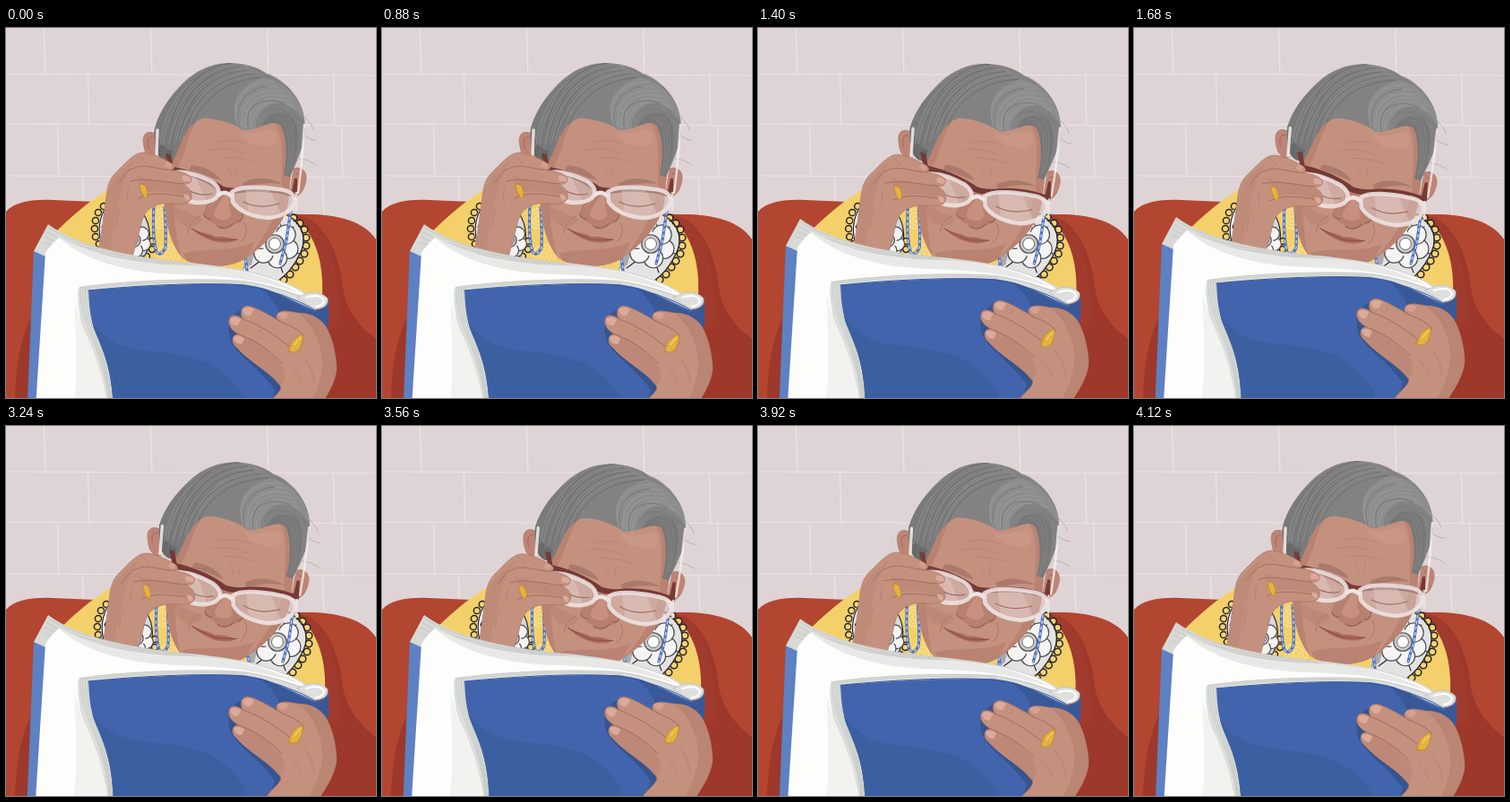
Animation, 413 px wide and 413 px high, one loop 4.16 s. Source, as an HTML page with a canvas:

```html
<!DOCTYPE html>
<html lang="en">
<head>
<meta charset="utf-8">
<title>Reading</title>
<style>
html, body { margin: 0; width: 100%; height: 100%; overflow: hidden; background: #dfd4d5; }
canvas { display: block; width: 100vw; height: 100vh; }
</style>
</head>
<body>
<canvas id="stage" width="413" height="413"></canvas>
<script>
const ctx = document.getElementById('stage').getContext('2d');
const LOOP = 4160, STEP = 40;
const SKIN = '#c4917f', SHADE = '#ba8573', LINE = '#a06d5f', INK = '#25232a';
ctx.lineCap = ctx.lineJoin = 'round';

const fill = (d, color) => { ctx.fillStyle = color; ctx.fill(new Path2D(d)); };
const line = (d, color, w = 1) => {
  ctx.strokeStyle = color;
  ctx.lineWidth = w;
  ctx.stroke(new Path2D(d));
};
const shape = (d, color, edge, w) => { fill(d, color); line(d, edge, w); };

function oval(x, y, rx, ry, rot, color, edge, w = 1) {
  ctx.beginPath();
  ctx.ellipse(x, y, rx, ry, rot, 0, Math.PI * 2);
  if (color) { ctx.fillStyle = color; ctx.fill(); }
  if (edge) { ctx.strokeStyle = edge; ctx.lineWidth = w; ctx.stroke(); }
}

function group(dx, dy, paint, rot = 0, cx = 0, cy = 0) {
  ctx.save();
  ctx.translate(cx + dx, cy + dy);
  ctx.rotate(rot);
  ctx.translate(-cx, -cy);
  paint();
  ctx.restore();
}

function clipped(d, paint) {
  ctx.save();
  ctx.clip(new Path2D(d));
  paint();
  ctx.restore();
}

// Bezier lines blended between two guide curves
function strands(a, b, n, color, w) {
  for (let i = 0; i < n; i++) {
    const k = n > 1 ? i / (n - 1) : 0;
    const p = a.map((v, j) => v + (b[j] - v) * k);
    line(`M${p[0]} ${p[1]}C${p.slice(2)}`, color, w);
  }
}

function wall() {
  ctx.fillStyle = '#dfd4d5';
  ctx.fillRect(0, 0, 413, 413);
  const c = '#ece4e4';
  for (const y of [51, 107, 165]) line(`M0 ${y}L413 ${y + 2}`, c, 1.2);
  const rows = [[0, 51, [43, 162, 292]], [52, 108, [92, 366]], [109, 166, [58, 375]], [167, 212, [86, 354]]];
  for (const [y1, y2, xs] of rows) {
    for (const x of xs) line(`M${x - .5} ${y1}L${x + .8} ${y2}`, c, 1.2);
  }
}

function sofa() {
  fill('M0 205C9 195 26 191 52 192L100 194L330 208C365 207 399 214 413 236V413H0Z', '#b24631');
  fill('M324 209C352 212 371 245 376 290C380 318 398 336 413 347V413H320Z', '#9d382b');
  fill('M324 209C350 213 366 240 370 288L372 330L350 340Z', '#a13b2d');
  fill('M29 320C18 342 11 375 10 413H40Z', '#9d382b');
}

function scallops(pts, r) {
  for (const [x, y] of pts) oval(x, y, r, r, 0, '#f4d472', INK, 1.5);
}

function flower(x, y, r) {
  for (let i = 0; i < 6; i++) {
    const a = i * Math.PI / 3 + .35;
    oval(x + Math.cos(a) * r * .6, y + Math.sin(a) * r * .6, r * .4, r * .4, a, '#f5f4f3', '#4c4b51', 1.2);
  }
  oval(x, y, r * .5, r * .5, 0, '#f3f2f1');
  oval(x, y, r * .38, r * .38, 0, '#c9c8ca', '#4c4b51', 1.2);
  oval(x, y, r * .24, r * .24, 0, '#fff', '#6b6a70', 1);
}

function chain(d) {
  line(d, '#4b6eb9', 3.2);
  ctx.setLineDash([2.5, 4]);
  line(d, '#b8c9ea', 1.6);
  ctx.setLineDash([]);
}

function dress() {
  fill('M118 178C94 192 74 209 48 235L60 300H353C355 265 347 228 318 208L240 215Z', '#f4d06a');
  for (const [x, y, r] of [[174, 213, 11], [181, 254, 12]]) {
    for (let k = 1; k > .2; k -= .35) oval(x, y, r * k, r * k, 0, null, '#f7dc8c', 2);
  }
  // left collar
  scallops([[109, 199], [103, 206], [100, 215], [99, 224], [100, 233], [104, 241]], 3.6);
  fill('M114 195C102 209 99 231 109 248H130V190Z', '#eeedec');
  line('M114 196C103 211 101 230 109 246M119 199L107 222L118 240', INK, 1.2);
  scallops([[163, 238], [163, 247], [157, 255], [148, 259]], 3.5);
  fill('M151 204C162 216 164 240 156 254L137 261L140 225Z', '#d8d8da');
  line('M153 207C162 220 163 240 155 254L140 258', INK, 1.2);
  flower(143, 237, 19);
  // right collar
  scallops([[321, 212], [328, 218], [333, 225], [335, 234], [335, 243], [333, 252], [328, 260], [323, 267], [317, 275], [310, 281]], 3.8);
  fill('M310 209C331 218 337 237 327 255C321 268 311 278 303 283L264 270L270 236Z', '#e3e3e4');
  fill('M272 234L283 219L295 222L280 240L274 264L264 270Z', '#a9a9ae');
  line('M314 209C333 219 337 238 326 256C320 268 311 277 304 282', INK, 1.4);
  line('M273 268L288 257M309 273L305 262M327 252L316 247M321 222L311 229', INK, 1.1);
  flower(300, 241, 27);
  chain('M165 198C164 218 164 238 168 250Q173 256 178 245C179 228 178 215 177 200');
  chain('M318 205C314 224 314 240 309 252L306 263');
  chain('M265 253Q269 261 269 272');
}

const HAIR = 'M181 150C168 149 164 128 166 112C171 94 182 77 197 62C211 48 228 40 247 39C264 39 281 43 291 51C315 59 331 82 333 101C336 122 329 137 325 148L317 166L310 164C315 144 313 119 306 108C297 101 283 114 265 114C251 105 231 100 219 101C200 108 195 131 187 148Z';

function hair() {
  fill(HAIR, '#828282');
  clipped(HAIR, () => {
    fill('M164 110C177 78 207 49 249 39L270 43C232 52 208 80 200 118L187 150H170Z', '#7a7a7a');
    fill('M166 112C171 124 175 135 187 138L181 151H168Z', '#686969');
    strands([267, 41, 222, 38, 178, 71, 172, 131], [286, 53, 243, 51, 211, 76, 196, 126], 8, '#898989', 1.4);
    strands([253, 39, 211, 44, 186, 75, 176, 145], [285, 55, 235, 60, 215, 88, 207, 112], 5, '#717172', 1.2);
    fill('M264 116C246 89 256 65 287 55C313 59 333 84 334 108C329 96 318 84 302 84C287 84 280 100 282 113Z', '#8d8d8d');
    strands([260, 110, 247, 82, 268, 59, 298, 60], [274, 113, 273, 91, 292, 74, 322, 88], 6, '#979797', 1.3);
    strands([262, 114, 253, 86, 268, 68, 292, 65], [280, 112, 277, 91, 300, 80, 332, 105], 3, '#7a7a7a', 1.1);
    fill('M285 111C291 93 309 89 320 100C330 113 326 141 316 169L309 165C314 137 313 117 306 108Z', '#777778');
    strands([294, 97, 317, 87, 327, 112, 318, 157], [304, 102, 315, 103, 319, 130, 313, 163], 3, '#848484', 1);
  });
  line('M329 96Q340 104 343 113M330 117Q338 125 346 125M327 146Q339 147 346 153M289 50Q304 54 311 64', '#a39b9b', .6);
}

const FACE = 'M217 97C198 107 190 130 183 150L177 195C178 218 184 242 197 257C216 269 248 269 266 258C291 242 311 218 315 195L319 150C321 118 311 92 280 98Z';

function head() {
  shape('M167 118C156 113 151 120 154 132C155 142 161 149 169 147Z', '#bd8575', '#ad7465', .7);
  line('M164 122Q156 121 159 135', '#a76e60', 1.1);
  shape('M321 157C331 153 338 162 334 174C331 185 326 190 317 187Z', '#bd8575', '#ad7465', .7);
  line('M324 163Q331 161 328 175', '#a76e60', 1.1);
  fill(FACE, SKIN);
  clipped(FACE, () => {
    fill('M217 98C202 116 203 137 191 157C186 185 185 220 197 260L175 245V100Z', '#ba8271');
    fill('M300 106C312 121 307 151 308 177C304 207 288 240 261 264L310 248L325 180V108Z', '#ba8271');
    fill('M260 116C277 121 289 112 299 114C306 121 304 133 291 132C276 131 267 127 260 116Z', '#ca9786');
    fill('M185 198C200 206 212 208 219 213C212 225 200 224 191 215Z', '#be8877');
    fill('M198 252C224 244 247 252 277 239L265 266H205Z', '#ba8271');
  });
  line('M232 128Q252 122 270 130M225 137Q246 131 265 140M239 145Q256 143 275 149M246 153L251 163M258 153L257 164', '#b7806f', .8);
  fill('M207 153C222 154 234 161 240 170C226 166 216 161 204 159Z', '#aa7a6c');
  fill('M264 173C278 166 292 166 309 174C291 172 279 174 266 179Z', '#aa7a6c');
  // nose
  fill('M237 180C232 190 220 199 221 207C224 216 231 217 236 222C243 226 250 223 254 219C263 218 267 213 263 207C253 197 252 185 255 180Z', '#b88070');
  fill('M243 187C238 197 231 204 232 210C239 217 250 215 252 208C248 199 249 193 250 185Z', '#c6917f');
  line('M221 207Q221 213 229 213M236 221Q244 227 254 218M264 207Q266 215 257 216', '#95604f', 1.1);
  line('M216 210Q204 216 203 229M266 217Q273 228 262 239', '#ab7464', .9);
  // mouth
  fill('M207 224C219 229 226 229 234 233C243 232 251 235 258 236C247 243 225 240 207 224Z', '#a9685b');
  line('M207 224Q221 232 234 236Q247 237 258 236', '#8d5044', 1.1);
  hair();
  // upper bar of the glasses
  line('M169 114L168 145', 'rgba(247,240,239,.85)', 3.4);
  line('M333 108C331 132 331 151 326 184', 'rgba(247,240,239,.8)', 2.5);
  fill('M178 140L184 141L187 155C209 159 228 167 243 177C250 179 258 179 266 178C287 175 306 179 319 183L322 168L325 168L325 190C304 183 283 182 262 184C249 186 238 183 230 177C216 168 201 164 183 160Z', '#763a34');
}

function lens(d, shine, lid) {
  fill(d, 'rgba(216,192,188,.52)');
  clipped(d, () => {
    fill(shine, 'rgba(238,226,225,.28)');
    line(lid, '#9c6f66', 1.2);
  });
  line(d, 'rgba(238,228,227,.88)', 4.6);
}

function glasses() {
  lens('M187 162C199 158 217 164 231 171C240 177 242 184 236 190C228 196 211 197 202 191C192 183 187 174 187 162Z',
    'M187 160L212 162L228 198H201Z', 'M201 178Q216 189 232 185');
  lens('M254 183C263 176 287 177 306 180C317 181 325 185 324 193C322 205 308 211 295 212C278 211 262 205 255 194Z',
    'M268 175L295 178L312 213H274Z', 'M267 194Q284 203 307 196');
  line('M240 186Q246 181 253 187', '#eee4e3', 4.4);
  line('M326 184L326 203', 'rgba(238,228,227,.88)', 2.6);
}

function raisedHand() {
  shape('M101 265C106 235 109 210 112 188C114 172 117 166 126 158C136 148 144 139 153 139C165 140 177 146 186 152C191 156 186 160 178 158C190 159 201 161 206 166C209 172 204 175 197 174C205 178 210 186 206 192C202 199 186 195 174 196C161 199 154 205 151 218C147 237 142 250 139 265Z', SKIN, '#a87567', .7);
  fill('M101 265L112 190C116 169 130 157 145 147C128 170 125 199 119 230L114 265Z', '#bf8b79');
  fill('M145 164C162 171 181 171 196 174C204 178 210 187 205 193C191 182 168 181 153 184Z', '#be8a78');
  line('M140 158C151 150 166 157 179 158M139 171C156 166 180 173 198 174M148 190C164 182 182 186 198 188M139 157Q131 164 126 172', LINE, .9);
  line('M149 143Q154 146 156 151M137 178Q134 186 136 194M127 201Q123 213 123 222', '#b37d6c', .8);
  fill('M197 165C203 164 207 167 206 171Q201 172 197 170Z', '#dcaa9a');
  fill('M198 186C204 185 207 189 204 193Q199 192 198 186Z', '#dcaa9a');
  fill('M180 149L186 152L184 157L177 154Z', '#d3a08e');
  shape('M149 175Q153 173 156 177Q160 186 156 190Q151 187 149 175Z', '#e5b23d', '#b98529', .7);
}

function book() {
  fill('M31 248L45 250L33 425L32 440H23Z', '#5d81c2');
  fill('M47 219L31 249L44 255L200 290L349 311L337 297C303 276 270 269 206 262C150 258 82 245 47 219Z', '#d8d9d6');
  strands([47, 222, 78, 244, 137, 255, 205, 263], [42, 239, 79, 253, 137, 262, 222, 270], 4, '#c3c5c2', .8);
  fill('M44 251C49 244 53 239 59 234C98 257 158 265 225 267C279 270 322 287 335 299L348 313L94 300L119 440H32Z', '#fdfdfc');
  fill('M56 231C94 253 141 264 207 265C252 267 291 276 329 296C284 281 250 277 196 275C137 274 85 260 56 231Z', '#e8e9e6');
  // turned pages behind the cover
  fill('M82 289C118 283 208 278 265 282C298 287 320 295 345 304L346 316L99 298C101 331 115 351 120 389L122 440H114C114 384 85 354 82 318C80 306 79 295 82 289Z', '#dcdeda');
  strands([83, 290, 81, 333, 112, 356, 116, 430], [91, 292, 91, 333, 115, 356, 119, 430], 4, '#c0c4c1', .8);
  fill('M77 294C75 334 112 360 113 440H71C84 395 76 351 77 294Z', '#f2f2ef');
  line('M82 290C126 283 212 278 267 283Q306 289 344 306M87 291C135 285 213 280 267 285', '#c3c6c3', .8);
  const cover = 'M92 293C137 289 201 285 261 286C294 288 320 305 345 315Q357 315 360 304L360 324L350 440H120C120 386 111 366 100 340C93 323 93 306 92 293Z';
  fill(cover, '#4264ad');
  clipped(cover, () => {
    fill('M94 325C120 362 146 358 182 363C224 369 244 378 268 413V440H100Z', '#3b60a2');
    fill('M277 286C302 292 328 314 346 317L361 309V338L307 323Q300 300 277 286Z', '#385898');
    fill('M264 314C249 319 245 334 251 350C261 368 283 380 300 404L288 440H340V335Z', '#36548f');
  });
  line('M92 293C160 286 230 284 263 287Q309 294 346 315', '#3558a2', 1);
  shape('M332 298C340 293 354 295 359 302C360 310 354 313 345 314C338 310 332 306 325 301Z', '#dfe0de', '#b9bdbc', .8);
  line('M335 301Q350 296 355 304Q354 310 346 311', '#fff', 2);
}

function holdingHand() {
  shape('M303 319C306 314 317 316 326 318C342 318 354 326 359 337C366 351 369 370 369 381C367 397 358 411 349 424L340 440H281L291 421C300 410 309 405 306 399C294 383 271 372 257 356C250 350 253 341 260 342C254 339 247 333 249 325C251 319 258 320 265 325C260 320 262 310 270 310C281 312 296 322 309 329C302 327 300 322 303 319Z', SKIN, '#9d6a5c', .8);
  fill('M326 318C341 329 353 352 353 374C353 398 341 419 328 440H340L349 424C358 411 367 397 369 381C369 370 366 351 359 337C354 326 342 318 326 318Z', SHADE);
  fill('M260 342C275 348 289 355 303 371C311 381 315 391 306 399C293 382 270 372 257 356C250 350 253 341 260 342Z', '#bd8877');
  line('M265 325C286 333 299 342 316 355M260 342C279 349 294 359 308 374M309 329Q326 335 333 344', LINE, 1);
  line('M284 321L281 325M285 336L281 340M287 357L282 360M317 378Q326 384 329 395M330 365Q343 378 344 396M334 324Q344 332 348 342', '#b37d6c', .8);
  fill('M264 314Q271 309 277 314L273 321Q265 322 264 314Z', '#dcaa9a');
  fill('M250 325Q255 320 262 325L259 332Q251 333 250 325Z', '#dcaa9a');
  fill('M254 345Q261 341 266 347L263 353Q255 353 254 345Z', '#dcaa9a');
  fill('M303 319Q309 315 315 319L313 324Q306 327 303 319Z', '#d5a08f');
  shape('M316 361C317 352 322 345 331 342C332 348 330 354 327 359Q322 364 316 361Z', '#e4b33c', '#b98529', .8);
  line('M322 354Q325 349 329 346', '#f2d47a', 1.1);
}

const clamp = v => Math.min(1, Math.max(0, v));
const ease = v => (1 - Math.cos(Math.PI * clamp(v))) / 2;

function draw(ms) {
  const t = Math.floor(ms / STEP) * STEP;
  const back = clamp((t - 3240) / 880);
  const p = ease((t - 840) / 840) - ease(back ** 2.5);
  const dip = Math.sin(Math.PI * back) * 2.2;
  const tilt = .045 * p;

  wall();
  sofa();
  group(3 * p, 0, dress);
  group(1.2 * p, dip, head, tilt, 225, 205);
  group(p - 2, 5 * p + dip * .6, glasses, .055 * p, 235, 190);
  group(3.5 * p, 3 * p + dip * .4, raisedHand);
  group(0, -8 * p, () => { book(); holdingHand(); });
}

const start = performance.now();
function frame() {
  draw((performance.now() - start) % LOOP);
  requestAnimationFrame(frame);
}
frame();
</script>
</body>
</html>
```
